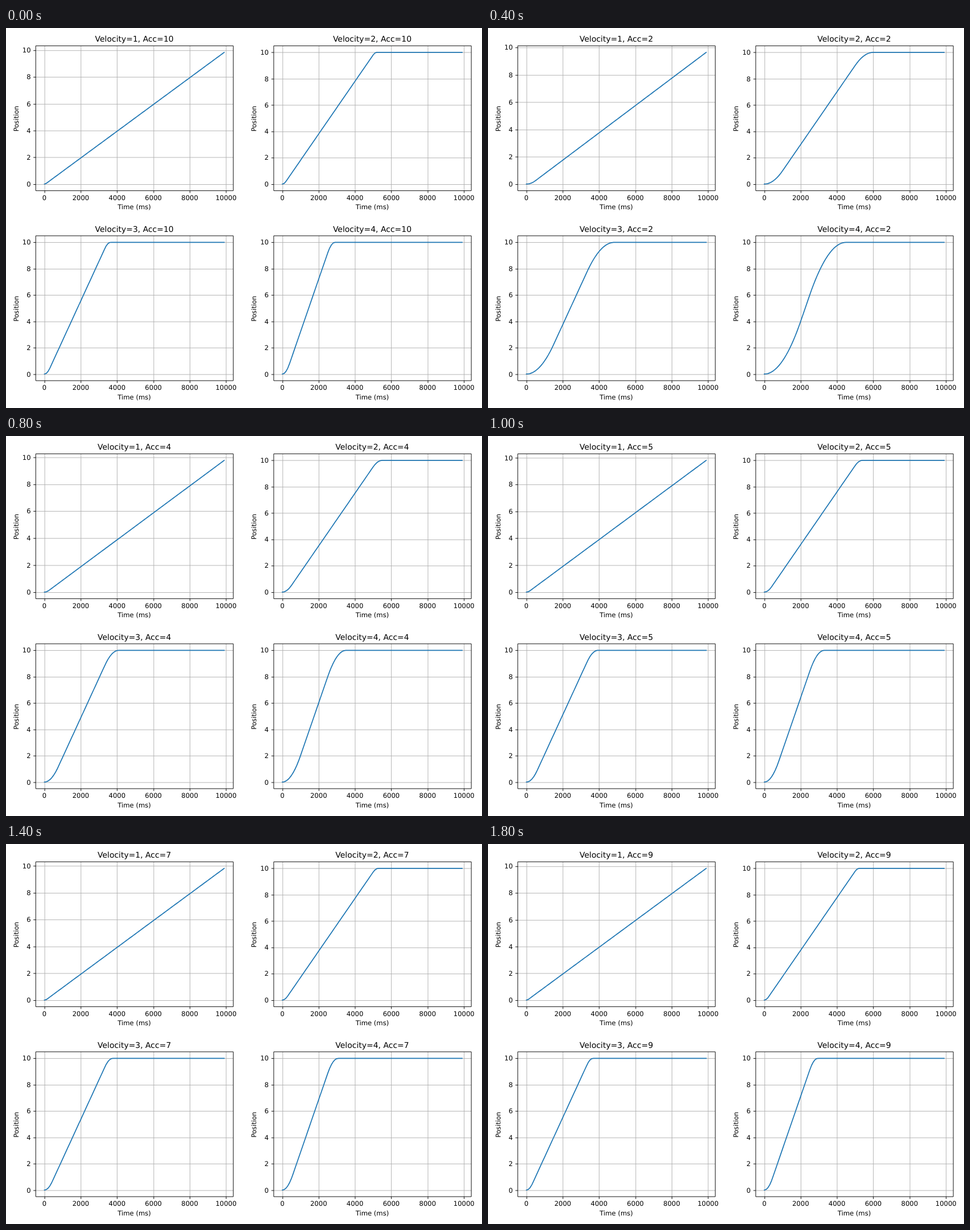
Write an HTML page that moves like this. It is 837 px wide and 669 px high and loops after 2 s.

```html
<!DOCTYPE html>
<html lang="en">
<head>
<meta charset="utf-8">
<title>Motion profiles</title>
<style>
  html, body { margin: 0; width: 837px; height: 669px; overflow: hidden; background: #fff; }
  svg { display: block; }
  text { font: 13.89px "DejaVu Sans", sans-serif; text-anchor: middle; text-rendering: geometricPrecision; }
  .title { font-size: 16.67px; }
  .end { text-anchor: end; }
  .grid { stroke: #b0b0b0; stroke-width: 1.11; fill: none; }
  .axis { stroke: #000; stroke-width: 1.11; fill: none; }
  .curve { stroke: #1f77b4; stroke-width: 2.08; fill: none; stroke-linecap: square; stroke-linejoin: round; }
  .step { visibility: hidden; animation: show 2s step-end infinite; }
  @keyframes show {
    0% { visibility: visible; }
    10%, 100% { visibility: hidden; }
  }
</style>
</head>
<body>
<!-- Laid out as a 1000 by 800 figure, scaled to the stage -->
<svg id="stage" width="837" height="669" viewBox="0 0 1000 800" preserveAspectRatio="none"></svg>
<script>
const GOAL = 10, LAST = 9.9, HEIGHT = 305;
const ACCS = [10, 1, 2, 3, 4, 5, 6, 7, 8, 9];

const snap = v => Math.round(v) + 0.5;
const path = (cls, d) => `<path class="${cls}" d="${d}"/>`;
const label = (x, y, s, attrs = '') => `<text x="${x.toFixed(2)}" y="${Math.round(y)}" ${attrs}>${s}</text>`;

// Position along a trapezoidal (or triangular) speed profile
function position(t, vmax, acc) {
  const v = Math.min(vmax, Math.sqrt(GOAL * acc));
  const ramp = v / acc, end = GOAL / v + ramp;
  if (t >= end) return GOAL;
  if (t < ramp) return acc * t * t / 2;
  if (t > end - ramp) return GOAL - acc * (end - t) ** 2 / 2;
  return v * (t - ramp / 2);
}

function plot(vel, acc) {
  const col = (vel - 1) % 2, row = vel > 2 ? 1 : 0;
  const dx = col * 499.8, top = 37.4 + row * 400, bottom = top + HEIGHT;
  const peak = position(LAST, vel, acc);
  const has10 = peak * 1.05 >= 10;
  // One-digit tick labels leave room for a wider plot
  const left = dx + (has10 ? 61.83 : 53), right = dx + 477.3, width = right - left;
  const X = t => left + width * (0.05 + t / LAST) / 1.1;
  const Y = p => bottom - HEIGHT * (0.05 + p / peak) / 1.1;
  const l = snap(left), r = snap(right), t = snap(top), b = snap(bottom), mid = (left + right) / 2;

  let grid = '', ticks = '', text = '', line = '';
  for (let n = 0; n <= 10; n += 2) {
    const x = snap(X(n));
    grid += `M${x} ${t}V${b}`;
    ticks += `M${x} ${b}v4.9`;
    text += label(X(n), bottom + 19.6, n * 1000);
    if (n === 10 && !has10) continue;
    const y = snap(Y(n));
    grid += `M${l} ${y}H${r}`;
    ticks += `M${l} ${y}h-4.9`;
    text += label(left - 9.7, Y(n) + 5.1, n, 'class="end"');
  }
  for (let i = 0; i < 100; i++) {
    line += (i ? 'L' : 'M') + X(i / 10).toFixed(2) + ' ' + Y(position(i / 10, vel, acc)).toFixed(2);
  }
  const lx = dx + 26, ly = Math.round((top + bottom) / 2 + 0.7);
  text += label(mid, top - 8.3, `Velocity=${vel}, Acc=${acc}`, 'class="title"')
    + label(mid, bottom + 39.6, 'Time (ms)')
    + label(lx, ly, 'Position', `transform="rotate(-90 ${lx} ${ly})"`);
  return path('grid', grid) + path('axis', ticks) + path('curve', line)
    + path('axis', `M${l} ${t}H${r}V${b}H${l}Z`) + text;
}

document.getElementById('stage').innerHTML = ACCS.map((acc, i) =>
  `<g class="step" style="animation-delay:${i ? i * 200 - 2000 : 0}ms">`
  + [1, 2, 3, 4].map(vel => plot(vel, acc)).join('') + '</g>').join('');
</script>
</body>
</html>
```
